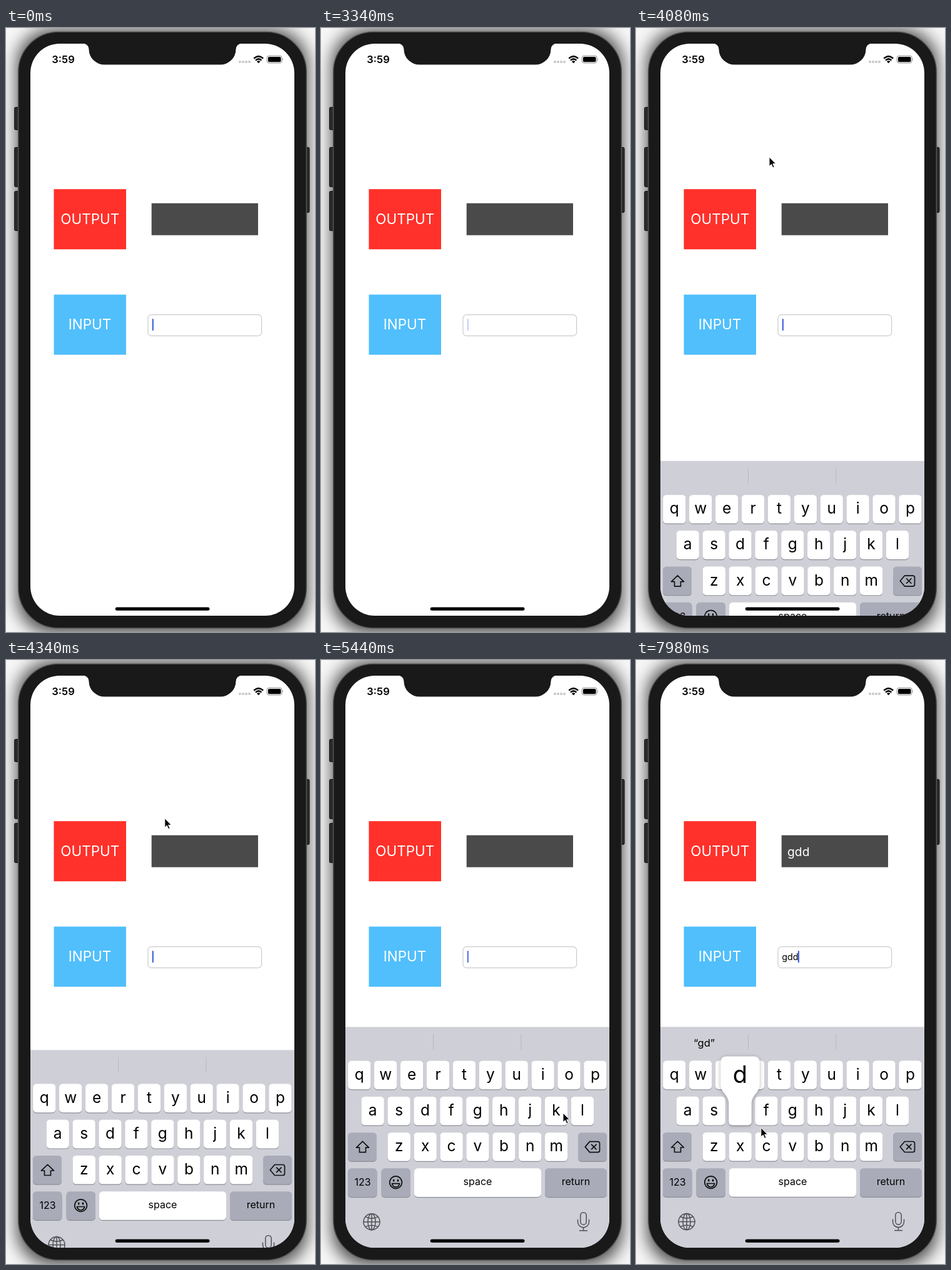
An HTML page for the animation above (8000 ms loop, 494 px wide and 964 px high).

```html
<!DOCTYPE html>
<html lang="en">
<head>
<meta charset="utf-8">
<title>Input and output</title>
<style>
  html, body { margin: 0; width: 100%; height: 100%; overflow: hidden; background: #f6f6f6; }
  svg { display: block; width: 494px; height: 964px; }
  text { font-family: Inter, Roboto, sans-serif; }
  .mid { text-anchor: middle; }
  .line { fill: none; stroke-linecap: round; stroke-linejoin: round; }
</style>
</head>
<body>
<svg viewBox="0 0 494 964" xmlns="http://www.w3.org/2000/svg">
  <defs>
    <clipPath id="screen"><rect x="39" y="25" width="422" height="913" rx="47"/></clipPath>
    <filter id="blur" x="-20%" y="-20%" width="140%" height="140%"><feGaussianBlur stdDeviation="13"/></filter>
    <filter id="lift" x="-30%" y="-30%" width="160%" height="160%">
      <feDropShadow dx="0" dy="1" stdDeviation="3" flood-opacity=".3"/>
    </filter>
  </defs>

  <!-- phone body -->
  <rect x="17" y="1" width="466" height="966" rx="58" opacity=".68" filter="url(#blur)"/>
  <g fill="#2a2a2a" stroke="#151515">
    <rect x="13.5" y="126.5" width="9" height="36" rx="2"/>
    <rect x="13.5" y="190.5" width="9" height="63" rx="2"/>
    <rect x="13.5" y="260.5" width="9" height="63" rx="2"/>
    <rect x="477" y="190.5" width="8" height="104" rx="2"/>
  </g>
  <rect x="19.7" y="6.2" width="460.6" height="951.6" rx="64" fill="#191919" stroke="#555" stroke-width="1.5"/>
  <rect x="39" y="25" width="422" height="913" rx="47" fill="#fff"/>
  <path d="M122 24.5Q132 25 132.500 34A25 24.500 0 0 0 157.500 58.500H342.500A25 24.500 0 0 0 367.500 34Q368 25 378 24.500Z" fill="#191919"/>

  <!-- status bar -->
  <text x="91.500" y="56" class="mid" font-size="16.500" font-weight="600">3:59</text>
  <g fill="#c9c9c9">
    <circle cx="374" cy="54" r="2.100"/><circle cx="379" cy="54" r="2.100"/>
    <circle cx="384" cy="54" r="2.100"/><circle cx="389" cy="54" r="2.100"/>
  </g>
  <g class="line" stroke="#000" stroke-width="2.500" style="stroke-linecap:butt">
    <path d="M396.300 48.700Q403.700 41.800 411.100 48.700"/>
    <path d="M399 51.600Q403.700 47.200 408.400 51.600"/>
  </g>
  <path d="M403.700 56.300L400.900 53.500Q403.700 51 406.500 53.500Z"/>
  <rect x="417.200" y="44.300" width="24" height="11.600" rx="3.300" fill="none" stroke="#8c8c8c"/>
  <rect x="418.900" y="46" width="20.600" height="8.200" rx="1.800"/>
  <path d="M442.400 48.300q1.600 1.800 0 3.700z" fill="#8c8c8c"/>

  <!-- form -->
  <rect x="76.500" y="257.200" width="115.500" height="96" fill="#ff312a"/>
  <rect x="76.500" y="425.500" width="115.500" height="96" fill="#50bffc"/>
  <g fill="#fff" font-size="22.500" class="mid">
    <text x="134.300" y="313">OUTPUT</text>
    <text x="134" y="481.300">INPUT</text>
  </g>
  <rect x="232.700" y="279.700" width="170.300" height="51" fill="#4a4a4a"/>
  <text id="output" x="242" y="313" font-size="19.300" fill="#fff"></text>
  <rect x="227" y="457.700" width="181.600" height="33.600" rx="5.500" fill="#fff" stroke="#cbcbcb" stroke-width="1.200"/>
  <text id="input" x="233.300" y="479.300" font-size="14.300"></text>
  <rect id="caret" x="233.700" y="464" width="2.200" height="19" rx="1" fill="#3f60df"/>

  <g clip-path="url(#screen)"><g id="keyboard"></g></g>
  <rect x="174.700" y="924.500" width="150.800" height="5.200" rx="2.600"/>
  <path id="pointer" d="M0 0V14.700L3.400 11.500L5.800 17L8.200 16L5.800 10.700H10.500Z" stroke="#fff"/>
</svg>

<script>
const LOOP = 8000;
const KEY_PITCH = 41.9, KEY_WIDTH = 36.3, KEY_HEIGHT = 45.6;
const ROWS = [
  { letters: 'qwertyuiop', x: 61.3, y: 639.6 },
  { letters: 'asdfghjkl', x: 82.7, y: 696.8 },
  { letters: 'zxcvbnm', x: 124.8, y: 754 }
];

// All steps are counted in ticks; three ticks last 20, 20 and 100 ms.
const KEYBOARD_START = 79.2, KEYBOARD_RATE = 0.2775, KEYBOARD_TRAVEL = 352.5;
const BLINK = { start: 90, period: 50 };
const POINTER = [
  [74, 6, 29], [80, 80, 100], [88, 213, 206], [94, 262, 262], [100, 309, 338],
  [108, 360, 590], [116, 387, 723], [126, 386, 731], [138, 264, 736],
  [149, 262, 736], [155, 172, 738], [166, 174, 739], [172, 205, 748]
];
const PRESSES = [
  { key: 'g', from: 140, to: 149 },
  { key: 'd', from: 154, to: 160 },
  { key: 'd', from: 164, to: 173 }
];
const TYPED = [[147, 'g', 244], [158, 'gd', 252], [169, 'gdd', 258.8]];
const HINT_TICK = 162;

const $ = id => document.getElementById(id);

function key(x, y, width, fill = '#fff') {
  const cap = (dy, color) =>
    `<rect x="${x}" y="${y + dy}" width="${width}" height="${KEY_HEIGHT}" rx="5.5" fill="${color}"/>`;
  return cap(1.2, '#8d8f96') + cap(0, fill);
}

const label = (x, y, size, text) =>
  `<text class="mid" x="${x}" y="${y}" font-size="${size}">${text}</text>`;

function buildKeyboard() {
  const dark = '#a9acb8';
  const letters = ROWS.map(row => [...row.letters].map((letter, i) => {
    const x = row.x + i * KEY_PITCH;
    return key(x - KEY_WIDTH / 2, row.y, KEY_WIDTH) + label(x, row.y + 30, 24.5, letter);
  }).join('')).join('');

  return `<rect x="39" y="585.5" width="422" height="353" fill="#cfcfd7"/>
    <path d="M179.500 597V621.500M320 597V621.500" stroke="#b9b9c0"/>
    <text id="hint" class="mid" x="109" y="617" font-size="16.500"></text>
    ${letters}
    ${key(43, 754, 46, dark)}${key(411, 754, 46, dark)}
    ${key(43, 811.2, 46.5, dark)}${key(96.5, 811.2, 46.5, dark)}
    ${key(149, 811.2, 203)}${key(358, 811.2, 99, dark)}
    ${label(66.5, 839, 16, '123')}${label(250.5, 838.3, 16, 'space')}${label(407.5, 838.3, 16, 'return')}
    <g class="line" stroke="#111" stroke-width="1.700">
      <path d="M66.500 768.300L76.500 778H71.500V785.500H61.500V778H56.500Z"/>
      <path d="M429.500 768.500H442.500Q445.500 768.500 445.500 771.500V782.500Q445.500 785.500 442.500 785.500H429.500L422.300 777Z"/>
      <path d="M432.500 773.200L440 780.700M440 773.200L432.500 780.700"/>
      <circle cx="119.600" cy="833.600" r="9.800"/>
      <path d="M113.500 835.500H125.700Q124.500 841 119.600 841T113.500 835.500Z"/>
    </g>
    <ellipse cx="116.200" cy="830.500" rx="1.300" ry="1.900"/><ellipse cx="123" cy="830.500" rx="1.300" ry="1.900"/>
    <g class="line" stroke="#505056" stroke-width="1.500">
      <circle cx="81" cy="896.500" r="13"/><ellipse cx="81" cy="896.500" rx="6" ry="13"/>
      <path d="M81 883.500V909.500M68 896.500H94M71 888.500Q81 893.500 91 888.500M71 904.500Q81 899.500 91 904.500"/>
      <rect x="414.800" y="881.500" width="9.400" height="19.500" rx="4.700"/>
      <path d="M410.500 893V896.500A9 9 0 0 0 428.500 896.500V893M419.500 905.500V910.500M413.500 910.500H425.500"/>
    </g>
    <g id="popup">
      <path filter="url(#lift)" fill="#fff" d="M-31-55Q-31-64-22-64H22Q31-64 31-55V-19C31-6 18-3 18 12V40Q18 45.500 12.500 45.500H-12.500Q-18 45.500-18 40V12C-18-3-31-6-31-19Z"/>
      <text id="popupLetter" class="mid" y="-21.500" font-size="38"></text>
    </g>`;
}

function tickAt(ms) {
  const shifted = ms + 20;
  const rest = shifted % 140;
  return 3 * Math.floor(shifted / 140) + (rest < 20 ? 0 : rest < 40 ? 1 : 2) - 1;
}

function follow(points, tick) {
  const next = points.findIndex(p => p[0] > tick);
  const [t0, x0, y0] = points[next - 1];
  const [t1, x1, y1] = points[next];
  const k = (tick - t0) / (t1 - t0);
  return [x0 + (x1 - x0) * k, y0 + (y1 - y0) * k];
}

function caretOpacity(tick) {
  const phase = (((tick - BLINK.start) / BLINK.period) % 1 + 1) % 1;
  if (phase < 0.5) return 1;
  if (phase < 0.85) return Math.max(0, 1 - (phase - 0.5) / 0.17);
  return Math.min(1, (phase - 0.85) / 0.11);
}

function keyboardOffset(tick) {
  const s = Math.max(0, tick - KEYBOARD_START) * KEYBOARD_RATE;
  return KEYBOARD_TRAVEL * (1 + s) * Math.exp(-s);
}

const show = (node, on) => node.setAttribute('visibility', on ? 'visible' : 'hidden');
const move = (node, x, y) => node.setAttribute('transform', `translate(${x} ${y})`);

function draw(ms) {
  const tick = tickAt(ms);
  move($('keyboard'), 0, keyboardOffset(tick));

  const pointerOn = tick >= POINTER[0][0];
  show($('pointer'), pointerOn);
  if (pointerOn) move($('pointer'), ...follow(POINTER, tick));

  const [, text, caretX] = TYPED.filter(step => step[0] <= tick).pop() || [0, '', 233.7];
  $('output').textContent = $('input').textContent = text;
  $('hint').textContent = tick >= HINT_TICK ? '“gd”' : '';
  $('caret').setAttribute('x', caretX);
  $('caret').setAttribute('opacity', text ? 1 : caretOpacity(tick));

  const press = PRESSES.find(p => tick >= p.from && tick < p.to);
  show($('popup'), press);
  if (press) {
    const row = ROWS.find(r => r.letters.includes(press.key));
    move($('popup'), row.x + row.letters.indexOf(press.key) * KEY_PITCH, row.y);
    $('popupLetter').textContent = press.key;
  }
}

function frame() {
  draw(performance.now() % LOOP);
  requestAnimationFrame(frame);
}

$('keyboard').innerHTML = buildKeyboard();
frame();
</script>
</body>
</html>
```
